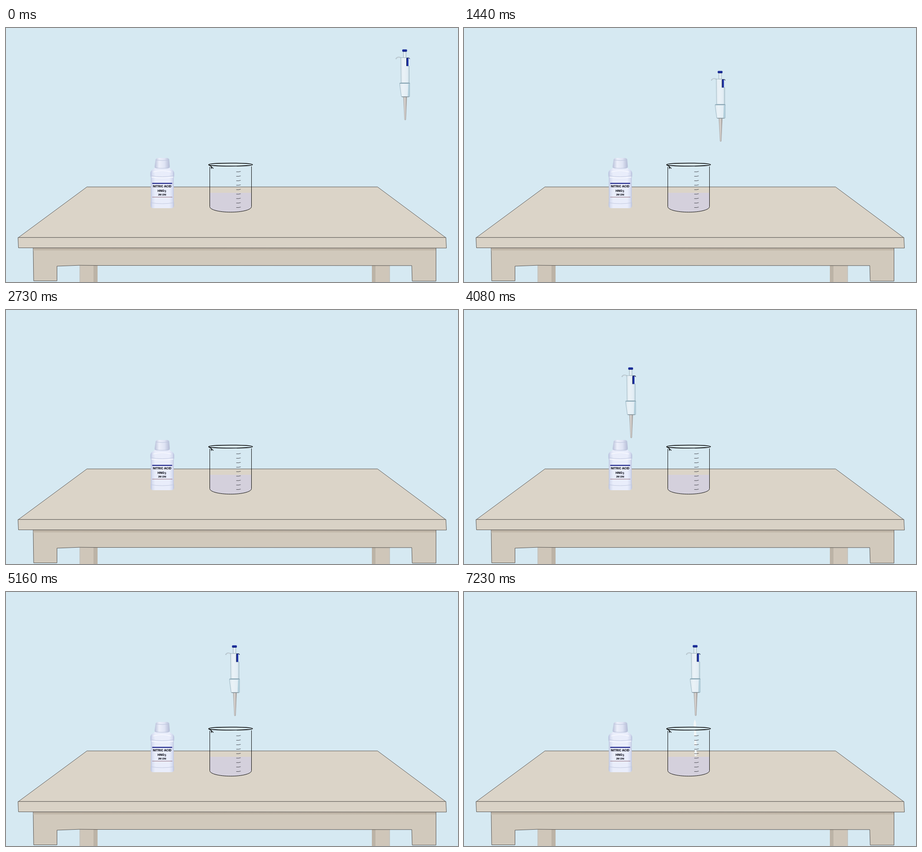
Animation, 997 px wide and 561 px high, one loop 7.68 s. Source, as an HTML page:

```html
<!DOCTYPE html>
<html lang="en">
<head>
<meta charset="utf-8">
<title>Adding nitric acid to a beaker</title>
<style>
  html, body { margin: 0; width: 100%; height: 100%; overflow: hidden; background: #d6e9f2; }
  svg { display: block; width: 997px; height: 561px; }
  .edge { stroke: #4a4744; stroke-width: .9; stroke-linejoin: round; }
  .ink { fill: none; stroke: #000; stroke-linecap: round; }
  .label { font-family: Inter, "Open Sans", sans-serif; font-weight: 800; fill: #15151f; text-anchor: middle; }
  .drop { fill: #f1f5f6; visibility: hidden; }
</style>
</head>
<body>
<svg viewBox="0 0 997 561" xmlns="http://www.w3.org/2000/svg">
  <defs>
    <linearGradient id="shade" x1="0" y1="0" x2="0" y2="1">
      <stop offset="0" stop-color="#b9afa1"/>
      <stop offset=".6" stop-color="#c0b6a8"/>
      <stop offset="1" stop-color="#d1c9bc"/>
    </linearGradient>
    <linearGradient id="plastic">
      <stop offset="0" stop-color="#b3bddb"/>
      <stop offset=".08" stop-color="#d8def1"/>
      <stop offset=".2" stop-color="#e9edfa"/>
      <stop offset=".8" stop-color="#e9edfb"/>
      <stop offset=".93" stop-color="#d5dbf0"/>
      <stop offset="1" stop-color="#b3bcda"/>
    </linearGradient>
    <linearGradient id="cap">
      <stop offset="0" stop-color="#b9c1da"/>
      <stop offset=".3" stop-color="#eceffa"/>
      <stop offset=".65" stop-color="#dfe4f4"/>
      <stop offset="1" stop-color="#b3bbd5"/>
    </linearGradient>
    <linearGradient id="tip">
      <stop offset="0" stop-color="#b5b0ad"/>
      <stop offset=".35" stop-color="#e0dcd9"/>
      <stop offset="1" stop-color="#a19b98"/>
    </linearGradient>
    <linearGradient id="shell">
      <stop offset="0" stop-color="#dce8ef"/>
      <stop offset=".3" stop-color="#eaf2f7"/>
      <stop offset=".8" stop-color="#e2edf4"/>
      <stop offset="1" stop-color="#bcd2dc"/>
    </linearGradient>
  </defs>

  <!-- table -->
  <g>
    <path d="M162 524h40v37h-40z" fill="#cfc6b9"/>
    <path d="M193 524h9v37h-9z" fill="#bcb3a6"/>
    <path d="M162 524h2v37h-2z" fill="#c5c4be"/>
    <path d="M807 524h40v37h-40z" fill="#cfc6b9"/>
    <path d="M807 524h8v37h-8z" fill="#bcb3a6"/>
    <path d="M845 524h2v37h-2z" fill="#c5c4be"/>
    <path class="edge" fill="#d1c9bc" d="M60 486H948.5V559H896L895 524.800L202 524.500L163 524.100L112.500 526V558.500H61Z"/>
    <path fill="url(#shade)" d="M60.500 486H948V492.500H60.500Z"/>
    <path class="edge" fill="#dbd4c8" d="M178.500 351H819.500L970 463H27Z"/>
    <path class="edge" fill="#d9d2c6" d="M26.500 462.700H970.300L971.500 486L27.500 485.500Z"/>
  </g>

  <!-- bottle -->
  <g>
    <path fill="url(#plastic)" d="M328 309C326 312 319 313 318.500 320V327L319.500 330V383L319 387V393Q319.500 398 325 398H364.500Q370 398 370.500 393V387L370 383V330L371 327V320C370 313 363 312 361 309Z"/>
    <path fill="none" stroke="#c3cae0" stroke-width="1" d="M319 326Q344 331 370.500 326M320 386Q344 390 370 386"/>
    <path fill="none" stroke="#f8f9ff" stroke-width="1.500" d="M325 318Q344 312 364 318M321 329.500Q344 333 369 329.500"/>
    <path fill="url(#cap)" d="M330 290.500Q331 287 336 287H354Q359 287 360 290.500L361.300 306Q361 310 355 310.500H334Q328 310 327.800 306Z"/>
    <path fill="none" stroke="#bdc5dd" stroke-width="1" d="M330 291.500Q345 294 360 291.500M328 308Q345 312 361 308"/>
    <path fill="#20278c" d="M322.500 342H366.500V344.300H322.500Z"/>
    <text class="label" x="344.500" y="352" font-size="6.700">NITRIC ACID</text>
    <text class="label" x="343.800" y="361.600" font-size="6.700">HNO<tspan font-size="5.800" dy="1.400">3</tspan></text>
    <text class="label" x="344.500" y="369.600" font-size="4.600">2M (2N)</text>
    <path stroke="#8d6470" stroke-width=".9" d="M322.500 373.500H367"/>
  </g>

  <!-- beaker -->
  <path fill="#d4d0dc" d="M450 364H541V395C541 402 520 406.500 495.500 406.500S450 402 450 395Z"/>
  <g id="drops"></g>
  <g class="ink">
    <path stroke-width=".95" d="M449.500 307V394.500C449.500 401.500 470 406.700 495.500 406.700S541.500 401.500 541.500 394.500V306"/>
    <ellipse cx="495.500" cy="301.700" rx="48.400" ry="3.300" stroke-width="1.450"/>
    <path stroke-width="1.400" d="M447 302.500L452.500 305.500L453 310.500M453 306.500L457 310"/>
    <path id="ticks" stroke="#33333a" stroke-width=".85"/>
  </g>

  <!-- pipette -->
  <g id="pipette">
    <path fill="none" stroke="#9fb0ba" stroke-width="2" d="M872 66.500C867 63.500 862 64 860 68.500"/>
    <path fill="none" stroke="#e9f0f4" stroke-width=".9" d="M872 66.800C867 64 862.500 64.500 860.500 68"/>
    <path fill="#e2edf3" stroke="#8ba0ac" stroke-width=".8" d="M876.500 52H882.300V65.500H876.500Z"/>
    <rect x="874" y="47.300" width="10.600" height="5" rx="1.500" fill="#1a2d9b"/>
    <path stroke="#101c66" stroke-width=".8" d="M875 51.800H883.800"/>
    <path fill="url(#shell)" stroke="#94abb7" stroke-width=".8" d="M870.800 65.500H884V84H889.500V121H871.500Z"/>
    <path fill="#1b2fa6" d="M883.500 66H887.700V84H883.500Z"/>
    <path fill="none" stroke="#172046" stroke-width="1.100" d="M883.500 66H888Q890 66 890.500 68.500M883.600 67V84"/>
    <path fill="url(#shell)" stroke="#8fabb9" stroke-width=".8" d="M868.300 122H890.500V151.500H872L868.800 128Z"/>
    <path fill="#b1cedb" d="M887.500 124H890.300V151H886.300Z"/>
    <path stroke="#83a2b1" stroke-width="1.800" d="M868.500 122H890.700"/>
    <path fill="url(#tip)" stroke="#8b8582" stroke-width=".6" d="M876.800 152H884L881.800 202.500Q880.500 204 879.300 202.500Z"/>
    <path stroke="#7f8c93" stroke-width="1.200" d="M873 152H889"/>
  </g>
</svg>
<script>
  const LOOP = 7680, STEP = 30, MOVE = 1800;
  const byId = id => document.getElementById(id);
  const pipette = byId("pipette");

  byId("ticks").setAttribute("d", Array.from({ length: 9 }, (_, i) =>
    `M508.300 ${317.700 + i * 9.850}q5 .6 9-.8`).join(""));

  // drops fall in one after another and stay
  const drops = Array.from({ length: 4 }, (_, i) => {
    const drop = document.createElementNS("http://www.w3.org/2000/svg", "path");
    drop.setAttribute("class", "drop");
    drop.setAttribute("d", "M0 0C1 3 2.900 7 2.900 11.500C2.900 15 1.500 16.500 0 16.500S-2.900 15 -2.900 11.500C-2.900 7 -1 3 0 0Z");
    drop.setAttribute("transform", `translate(${509.200 + i * 0.6} ${281.300 + i * 21.500})`);
    return byId("drops").appendChild(drop);
  });

  // cubic-bezier(.42, 0, .58, 1)
  function ease(p) {
    let lo = 0, hi = 1;
    for (let i = 0; i < 24; i++) {
      const s = (lo + hi) / 2;
      if (1.26 * s - 0.78 * s * s + 0.52 * s ** 3 < p) lo = s; else hi = s;
    }
    return 3 * lo * lo - 2 * lo ** 3;
  }

  function glide(t, start, from, to) {
    const p = Math.min(1, Math.max(0, (t - start) / MOVE));
    const e = p === 0 || p === 1 ? p : ease(p);
    return from.map((v, i) => v + (to[i] - v) * e);
  }

  function draw(now) {
    const t = Math.floor((now % LOOP + 0.01) / STEP) * STEP;
    const [x, y] = t < 2730
      ? glide(t, 450, [0, 0], [-536.8, 81])
      : glide(t, 3600, [-536.3, 81], [-369.5, 70]);
    pipette.setAttribute("transform", `translate(${x.toFixed(2)} ${y.toFixed(2)})`);
    pipette.style.visibility = t >= 2730 && t < 3180 ? "hidden" : "visible";
    drops.forEach((drop, i) => {
      drop.style.visibility = t >= 5880 + i * 450 ? "visible" : "hidden";
    });
  }

  function tick() {
    draw(performance.now());
    requestAnimationFrame(tick);
  }
  tick();
</script>
</body>
</html>
```
